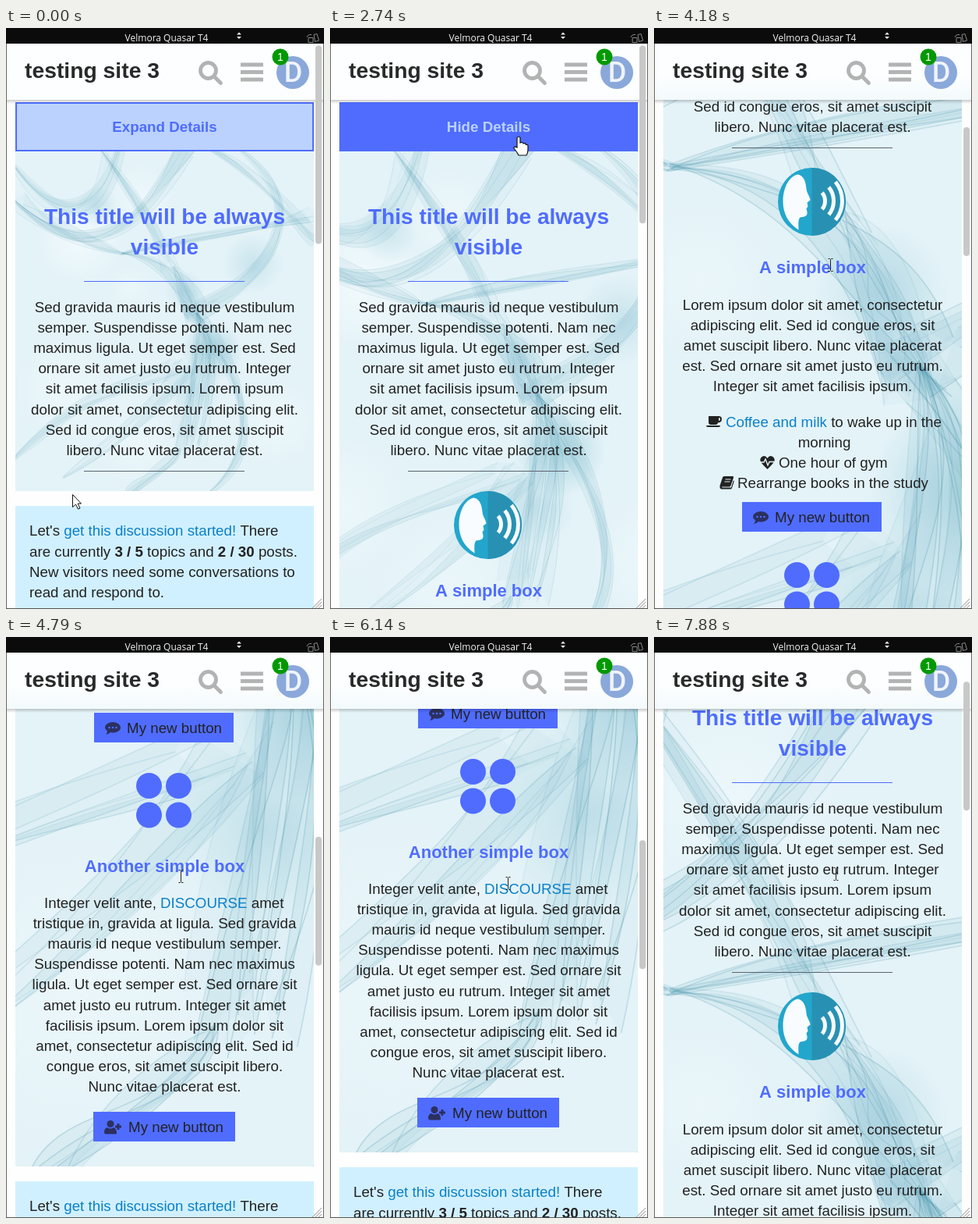
Recreate the animation shown at these times as an HTML page with a canvas. Size 408 px wide and 744 px high, loop 8 s.

```html
<!DOCTYPE html>
<html lang="en">
<head>
<meta charset="utf-8">
<title>Expandable banner</title>
<style>
html, body { margin: 0; width: 100%; height: 100%; overflow: hidden; background: #fff; }
canvas { display: block; width: 408px; height: 744px; }
</style>
</head>
<body>
<canvas id="stage" width="408" height="744"></canvas>
<script>
const ctx = document.getElementById('stage').getContext('2d');
const LOOP = 8000, MID = 203.5, TOP = 158, SIZE = 18.76, LINE = 26.2;
const BLUE = '#4f6cff', PALE = '#bbd2ff', LINK = '#0a80c8', INK = '#222';

// The screen refreshes in bursts: [first, last, steps].
const ticks = [0];
for (const [a, b, n] of [[500, 1220, 7], [1340, 1340, 1], [1480, 1840, 4], [2130, 2250, 2],
  [2620, 2860, 3], [3000, 3000, 1], [3150, 3390, 3], [3530, 3530, 1], [3670, 3800, 2],
  [3940, 4180, 3], [4430, 4910, 5], [5170, 5170, 1], [5310, 5440, 2], [5590, 5590, 1],
  [5870, 5990, 2], [6140, 6260, 2], [6400, 6400, 1], [6650, 7130, 5], [7380, 7880, 5]])
  for (let i = 0; i < n; i++) ticks.push(a + (n > 1 ? (b - a) * i / (n - 1) : 0));

// Wheel scrolling: [start, end, from, to].
const scrolls = [[3665, 4180, 0, 414], [4370, 4910, 414, 966], [5190, 5561, 966, 1380],
  [5770, 6323, 1380, 828], [6590, 7130, 828, 414], [7340, 7880, 414, 138]];

// Pointer path: [time, x, y, shape].
const pointer = [[0, 85, 597, 'arrow'], [480, 85, 597, 'arrow'], [1220, 296, 256, 'beam'],
  [1340, 313, 159, 'arrow'], [1480, 288, 144, 'hand'], [1840, 243, 117, 'hand'],
  [2250, 242, 116, 'hand'], [2620, 242, 138, 'hand'], [2740, 242, 138, 'hand'],
  [2860, 239, 170, 'arrow'], [3000, 234, 220, 'beam'], [3390, 226, 290, 'beam'],
  [3530, 226, 297, 'beam'], [3670, 226, 303, 'beam'], [4430, 226, 303, 'beam'],
  [4910, 223, 307, 'hand'], [5150, 223, 307, 'hand'], [5170, 226, 313, 'beam'],
  [5590, 226, 313, 'beam'], [6140, 228, 315, 'beam'], [7380, 228, 315, 'beam'],
  [7880, 233, 303, 'beam']];

const clamp = v => Math.max(0, Math.min(1, v));
const lerp = (a, b, p) => a + (b - a) * p;
const ease = u => u ** 3 * (10 - 15 * u + 6 * u * u);

function scrollAt(t) {
  let s = 0;
  for (const [a, b, from, to] of scrolls)
    if (t >= a) s = lerp(from, to, ease(clamp((t - a) / (b - a))));
  return Math.round(s);
}

function pointerAt(t) {
  let i = 0;
  while (i < pointer.length - 1 && pointer[i + 1][0] <= t) i++;
  const a = pointer[i], b = pointer[i + 1] || a;
  const p = b === a ? 0 : (t - a[0]) / (b[0] - a[0]);
  return [Math.round(lerp(a[1], b[1], p)), Math.round(lerp(a[2], b[2], p)), a[3]];
}

function rect(x, y, w, h, color) {
  ctx.fillStyle = color;
  ctx.fillRect(x, y, w, h);
}

function disc(x, y, r, color) {
  ctx.fillStyle = color;
  ctx.beginPath();
  ctx.arc(x, y, r, 0, 7);
  ctx.fill();
}

function shape(x, y, d, fill, stroke, width = 1) {
  const path = new Path2D(d);
  ctx.save();
  ctx.translate(x, y);
  if (fill) { ctx.fillStyle = fill; ctx.fill(path); }
  if (stroke) { ctx.strokeStyle = stroke; ctx.lineWidth = width; ctx.stroke(path); }
  ctx.restore();
}

const font = (size, weight, family = '"Liberation Sans", Arial, sans-serif') =>
  weight + ' ' + size + 'px ' + family;

// y is the middle of the line box.
function text(str, x, y, { size = SIZE, color = INK, bold = false, align = 'left' } = {}) {
  ctx.font = font(size, bold ? 700 : 400);
  ctx.textAlign = align;
  ctx.fillStyle = color;
  ctx.fillText(str, x, Math.round(y + size * 0.3465));
  return ctx.measureText(str).width;
}

const centered = (lines, y, opt, step = LINE) =>
  lines.forEach((s, i) => text(s, MID, y + i * step, { ...opt, align: 'center' }));

// Each part is a string or [string, style].
function run(x, y, ...parts) {
  for (const part of parts) {
    const [s, opt] = [].concat(part);
    x += text(s, x, y, opt);
  }
}

// Smoke strands as cubic curves in thousandths of the banner height, x from its middle.
const strands = [
  [-127, 301, 50, 250, 250, 230, 440, 190], [-127, 301, 0, 330, 60, 400, 95, 475],
  [95, 475, 110, 560, 70, 640, 46, 876], [95, 475, 150, 560, 140, 650, 100, 860],
  [-127, 301, -220, 260, -300, 240, -440, 150], [-200, -20, -90, 130, -40, 230, 25, 337],
  [25, 337, 50, 380, 60, 430, 95, 475], [-300, 960, -127, 848, -20, 760, 60, 640],
  [200, -20, 420, 120, 380, 330, 95, 475], [110, -20, 300, 60, 420, 250, 460, 300],
  [-460, 920, -300, 760, -200, 700, 46, 640], [110, 1020, 300, 900, 260, 700, 95, 475],
  [-460, 20, -350, 180, -200, 260, -150, -20], [-460, 130, -250, 330, -100, 290, 60, -20],
  [46, 876, 20, 930, -60, 960, -130, 1020]];
const TEAL = '92,170,188', WHITE = '248,253,255';
const clouds = [[-250, 260, 130, WHITE, .7], [-70, 130, 100, WHITE, .4], [-80, 850, 150, WHITE, .3],
  [-100, 400, 70, WHITE, .3], [140, 590, 90, TEAL, .4], [90, 700, 80, TEAL, .2],
  [260, 330, 90, TEAL, .2], [60, 410, 60, TEAL, .2], [-300, 700, 150, WHITE, .4],
  [330, 800, 130, WHITE, .4], [-200, 160, 60, TEAL, .2]];

function smoke(h) {
  let seed = 7;
  const rnd = () => (seed = seed * 16807 % 2147483647) / 2147483647 - 0.5;
  const k = h / 1000;
  ctx.save();
  ctx.beginPath();
  ctx.rect(12, TOP, 383, h);
  ctx.clip();
  rect(12, TOP, 383, h, '#e4f3f8');
  ctx.translate(MID, TOP);
  for (const [x, y, r, rgb, a] of clouds) {
    const g = ctx.createRadialGradient(x * k, y * k, 0, x * k, y * k, r * k);
    g.addColorStop(0, `rgba(${rgb},${a})`);
    g.addColorStop(1, `rgba(${rgb},0)`);
    disc(x * k, y * k, r * k, g);
  }
  // Thin veils hang between neighbouring filaments.
  ctx.fillStyle = 'rgba(70,150,170,.035)';
  ctx.lineWidth = Math.max(0.6, h / 900);
  for (const c of strands) {
    let prev;
    for (let i = 0; i < 8; i++) {
      const q = c.map((v, j) => (v + rnd() * (j < 2 ? 8 : 75)) * k);
      ctx.strokeStyle = `rgba(60,138,158,${0.15 + rnd() * 0.16})`;
      ctx.beginPath();
      ctx.moveTo(q[0], q[1]);
      ctx.bezierCurveTo(...q.slice(2));
      ctx.stroke();
      if (prev) {
        ctx.lineTo(prev[6], prev[7]);
        ctx.bezierCurveTo(prev[4], prev[5], prev[2], prev[3], prev[0], prev[1]);
        ctx.fill();
      }
      prev = q;
    }
  }
  ctx.restore();
}

function toggle(t) {
  const hover = clamp((t - 1400) / 300);
  rect(12, 95, 383, 63, BLUE);
  ctx.globalAlpha = 1 - hover;
  rect(14, 97, 379, 59, PALE);
  ctx.globalAlpha = 1;
  centered([t < 2600 ? 'Expand Details' : 'Hide Details'], 126,
    { bold: true, color: hover > 0.5 ? PALE : BLUE });
}

function speaker(x, y) {
  disc(x, y, 43.5, '#23a6cc');
  ctx.fillStyle = '#2891b3';
  ctx.beginPath();
  ctx.arc(x, y, 43.5, -Math.PI / 2, Math.PI / 2);
  ctx.fill();
  shape(x, y, 'M-18-35C-9-33-8-24-7-17C-7-12-2-6-2-2L-6 1L-5 6L-7 9L-6 13C-5 20-12 19-15 20' +
    'C-18 23-17 28-17 36C-30 28-37 15-37 0C-37-20-28-33-18-35Z', '#f8fcfe');
  ctx.strokeStyle = '#f8fcfe';
  ctx.lineWidth = 5;
  for (const r of [17, 28, 39]) {
    ctx.beginPath();
    ctx.arc(x, y - 1, r, -0.68, 0.68);
    ctx.stroke();
  }
}

function button(x, y, w) {
  rect(x, y, w, 38, BLUE);
  text('My new button', x + w - 15, y + 19.5, { align: 'right' });
}

function banner(bottom) {
  smoke(bottom - TOP);
  ctx.save();
  ctx.beginPath();
  ctx.rect(12, TOP, 383, bottom - TOP);
  ctx.clip();
  centered(['This title will be always', 'visible'], 241, { size: 28.1, bold: true, color: BLUE }, 39);
  rect(100, 324, 206, 1, BLUE);
  centered(['Sed gravida mauris id neque vestibulum', 'semper. Suspendisse potenti. Nam nec',
    'maximus ligula. Ut eget semper est. Sed', 'ornare sit amet justo eu rutrum. Integer',
    'sit amet facilisis ipsum. Lorem ipsum', 'dolor sit amet, consectetur adipiscing elit.',
    'Sed id congue eros, sit amet suscipit', 'libero. Nunc vitae placerat est.'], 357);
  rect(100, 567, 206, 1, '#5c6470');

  speaker(202.5, 636.5);
  const head = { size: 22, bold: true, color: BLUE };
  centered(['A simple box'], 720, head);
  centered(['Lorem ipsum dolor sit amet, consectetur', 'adipiscing elit. Sed id congue eros, sit',
    'amet suscipit libero. Nunc vitae placerat', 'est. Sed ornare sit amet justo eu rutrum.',
    'Integer sit amet facilisis ipsum.'], 768);

  // coffee cup
  shape(67, 911, 'M3 0H16Q20 0 20 4T15 8.5Q14.5 11 12 11H6Q3 11 3 8ZM16 2V6Q18 6 18 4T16 2Z' +
    'M0 12H18Q18 14 16 14H2Q0 14 0 12Z', INK);
  run(92, 918, ['Coffee and milk', { color: LINK }], ' to wake up in the');
  text('morning', 218.5, 944.2, { align: 'center' });
  // heartbeat
  shape(136, 962, 'M9.5 3Q7-1 3.500.5Q0 2 .3 6Q1 9 9.500 17Q18 9 18.700 6Q19 2 15.500.5Q12-1 9.500 3Z', INK);
  shape(136, 962, 'M0 8H5L7 4L10 12L12 7.500H19', null, '#e8f3f7', 1.4);
  text('One hour of gym', 160, 970.4);
  // book
  shape(84, 988, 'M6 0H17Q18.500 0 18 2L14.500 12Q14 13.500 12 13.500H3Q3 14.500 4 14.500H15L18 5' +
    'Q19 6 18.500 7.500L16 15Q15.500 16.500 14 16.500H3Q0 16.500.5 12L4 1.500Q4.500 0 6 0Z', INK);
  shape(84, 988, 'M7.500 4H14.500M6.500 7H13.500', null, '#dcecf3', 1.2);
  text('Rearrange books in the study', 107, 996.6);

  button(113, 1021, 179);
  // speech bubble
  shape(127, 1033, 'M10 0C15 0 20 3 20 7S15 13.500 10 13.500Q8 13.500 7 13Q4 16 1 16Q3 14 3 11.500' +
    'Q0 9.500 0 7C0 3 5 0 10 0Z', '#2b3060');
  for (const x of [132.5, 137, 141.5]) disc(x, 1040, 1.3, BLUE);

  for (const y of [1114.5, 1152]) for (const x of [183.5, 221.5]) disc(x, y, 16.5, BLUE);

  centered(['Another simple box'], 1217, head);
  run(49, 1264, 'Integer velit ante, ', ['DISCOURSE', { color: LINK }], ' amet');
  centered(['tristique in, gravida at ligula. Sed gravida', 'mauris id neque vestibulum semper.',
    'Suspendisse potenti. Nam nec maximus', 'ligula. Ut eget semper est. Sed ornare sit',
    'amet justo eu rutrum. Integer sit amet', 'facilisis ipsum. Lorem ipsum dolor sit',
    'amet, consectetur adipiscing elit. Sed id', 'congue eros, sit amet suscipit libero.',
    'Nunc vitae placerat est.'], 1264 + LINE);
  button(112, 1532, 182);
  // person with plus
  disc(134, 1547.5, 4.5, '#2b3060');
  shape(126, 1552, 'M4 0Q8 3 12 0Q16 1 16 8Q15 8.500 14 8.500H2Q0 8.500 0 6Q0 1 4 0Z', '#2b3060');
  shape(126, 1542, 'M18 5V13M14 9H22', null, '#2b3060', 2.8);
  ctx.restore();
}

function below(y) {
  rect(12, y + 19, 383, 143, '#d1f0ff');
  const bold = { bold: true };
  run(30, y + 50.5, "Let's ", ['get this discussion started!', { color: LINK }], ' There');
  run(30, y + 77, 'are currently ', ['3 / 5', bold], ' topics and ', ['2 / 30', bold], ' posts.');
  run(30, y + 103, 'New visitors need some conversations to');
  run(30, y + 129.5, 'read and respond to.');

  rect(12, y + 171, 113, 37, '#e9e9e9');
  text('Latest', 26, y + 189);
  shape(92, y + 186, 'M0 0H12L6 6Z', '#555');
  rect(249, y + 171, 146, 38, '#e9e9e9');
  shape(264, y + 181, 'M8 0V16M0 8H16', null, '#444', 4.4);
  text('New Topic', 293, y + 189);

  rect(12, y + 226, 383, 3, '#e6e6e6');
  // pushpin
  shape(12, y + 244, 'M3 0H13V2.500H11.500V8Q15.500 9.500 15.500 13H9L8 20L7 13H.5Q.5 9.500 4.500 8V2.500H3Z', '#999');
  text('Welcome to Discourse', 37, y + 254, { size: 21.5, color: '#919191' });
  text('0', 388, y + 251, { size: 24, bold: true, color: '#919191', align: 'right' });
  ['blah blah The first paragraph of this pinned', 'topic will be visible as a welcome message',
    'to all new visitors on your homepage. It’s', 'important! Edit this into a brief description of',
    'your community: Who is it for? What …', 'read more'].forEach((s, i) =>
    text(s, 12, y + 289 + i * LINE, { color: i < 5 ? '#646464' : LINK }));
}

function header(scrolled) {
  const g = ctx.createLinearGradient(0, 20, 0, 92);
  g.addColorStop(0, '#fdfeff');
  g.addColorStop(0.6, '#fcfeff');
  g.addColorStop(1, scrolled ? '#f3fafc' : '#fbfdff');
  rect(0, 20, 408, 72, g);
  const s = ctx.createLinearGradient(0, 92, 0, 97);
  s.addColorStop(0, 'rgba(0,0,0,.2)');
  s.addColorStop(1, 'rgba(0,0,0,0)');
  rect(0, 92, 408, 5, s);
  text('testing site 3', 24, 54.5, { size: 28.3, bold: true, color: '#2a2a2a' });
  ctx.lineCap = 'round';
  shape(259.5, 54.5, 'M10 0A10 10 0 1 1-10 0A10 10 0 1 1 10 0M8 8L16 16', null, '#b3b3b3', 4.8);
  ctx.lineCap = 'butt';
  for (const y of [44.5, 54, 63.5]) rect(301, y, 29, 5, '#b3b3b3');
  disc(368, 57, 21, '#8aa8da');
  ctx.font = font(36, 500, 'Roboto, sans-serif');
  ctx.textAlign = 'center';
  ctx.fillStyle = '#f0f4fb';
  ctx.fillText('D', 368.5, 69);
  disc(352, 37, 10.5, '#090');
  text('1', 352, 37, { size: 14, color: '#fff', align: 'center' });
}

function deviceBar() {
  rect(0, 0, 408, 20, '#0b0b0b');
  ctx.font = font(12, 400, '"Open Sans", sans-serif');
  ctx.textAlign = 'center';
  ctx.fillStyle = '#f2f2f2';
  ctx.fillText('Velmora Quasar T4', 206, 17);
  shape(299, 10, 'M-3-1.500L0-4.500L3-1.500ZM-3 1L0 4L3 1Z', '#eee');
  shape(386, 6, 'M2 6.500H8V12.500H2ZM9 2.500L13 1.500L15.500 10L10.500 11.500ZM0 6Q1 2 6 2.500', null, '#888');
}

function scrollbar(scroll, grow) {
  ctx.fillStyle = '#c8c8c8';
  ctx.beginPath();
  ctx.roundRect(397, 22.5 + scroll * 0.2525, 8, 1 / (0.003937 + 0.002123 * grow), 4);
  ctx.fill();
}

function cursor(x, y, kind) {
  if (kind === 'arrow')
    shape(x + .5, y + .5, 'M0 0V16L4 12.500L7 18.500L9.500 17.500L6.700 11.500H11Z', '#fff', '#111');
  else if (kind === 'hand')
    shape(x, y + 1, 'M-2 1.500Q0-1.500 2 1.500V8Q5 6.500 6 9Q9 8 9.500 10.500Q12 9.500 12 12.500V17' +
      'Q12 21 10 24H0Q-2 20-6 15Q-6.500 12-2 14Z', '#fff', '#111', 1.2);
  else
    shape(x + .5, y + .5, 'M0-7V7M-3-8H-1L0-7L1-8H3M-3 8H-1L0 7L1 8H3', null, '#222');
}

function draw(t) {
  const scroll = scrollAt(t);
  const grow = 0.5 - 0.5 * Math.cos(Math.PI * clamp((t - 2495) / 800));
  const bottom = 593 + Math.round(1008.5 * grow);

  rect(0, 0, 408, 744, '#fefefe');
  ctx.save();
  ctx.translate(0, -scroll);
  toggle(t);
  banner(bottom);
  below(bottom);
  ctx.restore();

  header(scroll > 0);
  deviceBar();
  scrollbar(scroll, grow);
  shape(393, 731, 'M0 12L12 0M4 12L12 4M8 12L12 8', null, '#999');
  rect(0, 20, 1, 724, '#666');
  rect(407, 20, 1, 724, '#666');
  rect(0, 743, 408, 1, '#555');
  cursor(...pointerAt(t));
}

let last = -1;
const start = performance.now();
function frame() {
  const now = (performance.now() - start) % LOOP;
  const tick = ticks.reduce((a, b) => b <= now ? b : a, 0);
  if (tick !== last) draw(last = tick);
  requestAnimationFrame(frame);
}
frame();
</script>
</body>
</html>
```
